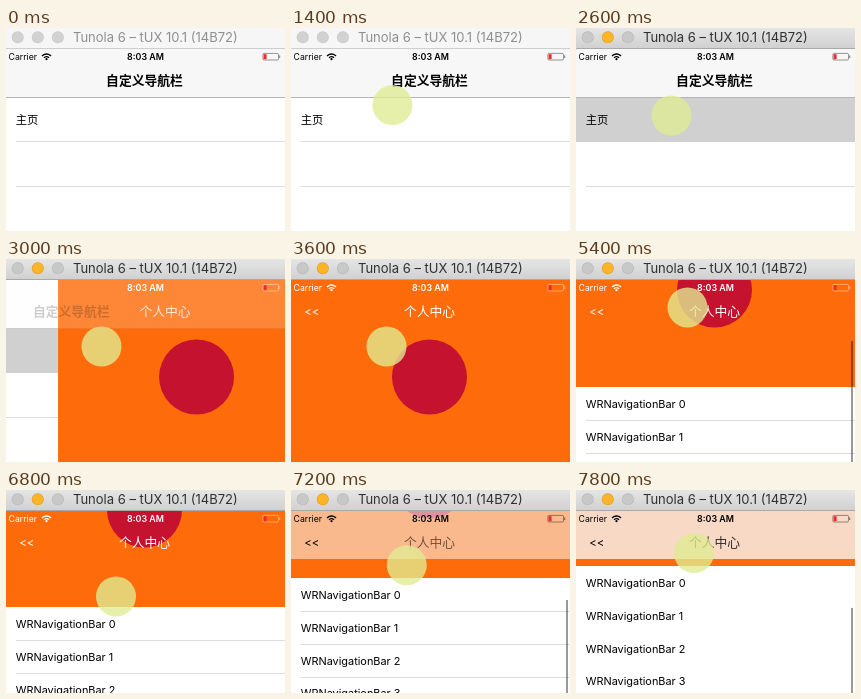
These frames come from a looping animation (279x203 px, 8000 ms). An HTML page with a canvas:

```html
<!DOCTYPE html>
<html lang="zh-CN">
<head>
<meta charset="utf-8">
<style>
html, body { margin: 0; width: 100%; height: 100%; overflow: hidden; background: #fff; }
canvas { display: block; width: 279px; height: 203px; }
</style>
</head>
<body>
<canvas id="stage" width="279" height="203"></canvas>
<script>
const W = 279, H = 203, LOOP = 8000, STEP = 200;
const BAR_TOP = 21, NAV_BOTTOM = 69, HOME_ROW = 45, ROW = 32.9, HEADER = 215;
const ORANGE = '#fe6b0a', LOGO = '#c4122f', LINE = '#dcdcdf';
const SANS = 'Inter, "Noto Sans CJK SC", "Noto Sans CJK", sans-serif';
const CJK = '"Noto Sans CJK SC", "Noto Sans CJK", sans-serif';
const ctx = document.getElementById('stage').getContext('2d');

// The pointer glides in, pulls down, drags the list, returns and drags again.
const start = { x: 148.5, y: -6, scroll: 0 };
const moves = [
  { from: 600, to: 1800, power: 2, x: 95.5, y: 87.5, scroll: 0 },
  { from: 3800, to: 4400, power: 1, x: 104.8, y: 126, scroll: 0 },
  { from: 4400, to: 5700, power: 1.5, x: 112.3, y: 38.8, scroll: 98 },
  { from: 5700, to: 6700, power: 1.5, x: 110, y: 106.5, scroll: 98 },
  { from: 6800, to: 7500, power: 1.5, x: 118, y: 63, scroll: 139 }
];

const clamp = v => Math.max(0, Math.min(1, v));
const mix = (a, b, f) => a + (b - a) * f;
const ease = (t, from, to, power) => 1 - (1 - clamp((t - from) / (to - from))) ** power;

function pointerAt(t) {
  return moves.reduce((p, m) => {
    const f = ease(t, m.from, m.to, m.power);
    return { x: mix(p.x, m.x, f), y: mix(p.y, m.y, f), scroll: mix(p.scroll, m.scroll, f) };
  }, start);
}

function rect(x, y, w, h, color) {
  ctx.fillStyle = color;
  ctx.fillRect(x, y, w, h);
}

function disc(x, y, r, color) {
  ctx.fillStyle = color;
  ctx.beginPath();
  ctx.arc(x, y, r, 0, Math.PI * 2);
  ctx.fill();
}

function text(str, x, y, font, color, align = 'left', alpha = 1) {
  ctx.globalAlpha = alpha;
  ctx.font = font;
  ctx.fillStyle = color;
  ctx.textAlign = align;
  ctx.fillText(str, x, y);
  ctx.globalAlpha = 1;
}

function drawHome(x, selected) {
  rect(x, BAR_TOP, W, H, '#fff');
  for (const row of [1, 2]) rect(x + 10, NAV_BOTTOM - 1 + row * HOME_ROW, W, 1, LINE);
  if (selected) rect(x, NAV_BOTTOM, W, HOME_ROW, '#d0d0d0');
  text('主页', x + 9.7, 95.8, `11.3px ${CJK}`, '#000');
}

function drawProfile(x, scroll) {
  const bottom = Math.round(HEADER - scroll);
  rect(x, BAR_TOP, W, H, '#fff');
  rect(x, BAR_TOP, W, bottom - BAR_TOP, ORANGE);
  disc(x + 138.5, bottom - 97, 37.5, LOGO);
  for (let i = 0; bottom + i * ROW < H; i++) {
    const top = bottom + i * ROW;
    text('WRNavigationBar ' + i, x + 9.7, top + 20.7, `10.9px ${SANS}`, '#000');
    if (scroll < 139) rect(x + 10, Math.round(top + ROW), W, 1, LINE);
  }
}

function drawNavBackground(alpha, hairline) {
  ctx.globalAlpha = alpha;
  rect(0, BAR_TOP, W, NAV_BOTTOM - BAR_TOP, '#f7f7f7');
  if (hairline) rect(0, NAV_BOTTOM, W, 1, '#b4b4b4');
  ctx.globalAlpha = 1;
}

function drawStatus(color) {
  text('Carrier', 2.6, 32.2, `8.7px ${SANS}`, color);
  text('8:03 AM', 139.5, 32.2, `600 8.9px ${SANS}`, color, 'center');
  ctx.strokeStyle = color;
  ctx.lineWidth = 1.3;
  for (const r of [3.3, 6]) {
    ctx.beginPath();
    ctx.arc(40.5, 32, r, -Math.PI * 0.77, -Math.PI * 0.23);
    ctx.stroke();
  }
  disc(40.5, 31.2, 1.1, color);
  ctx.globalAlpha = 0.5;
  ctx.lineWidth = 0.8;
  ctx.beginPath();
  ctx.roundRect(256.9, 25.4, 15.6, 6.6, 1.3);
  ctx.stroke();
  rect(273.2, 27.4, 1, 2.6, color);
  ctx.globalAlpha = 1;
  rect(257.6, 26.2, 3, 5, '#f5282d');
}

function drawWindowBar(active) {
  const shade = ctx.createLinearGradient(0, 0, 0, BAR_TOP);
  shade.addColorStop(0, active ? '#e6e5e6' : '#f6f6f6');
  shade.addColorStop(1, active ? '#d1d0d1' : '#f6f6f6');
  rect(0, 0, W, BAR_TOP, shade);
  rect(0, BAR_TOP - 1, W, 1, active ? '#a9a9a9' : '#cecece');
  for (let i = 0; i < 3; i++) {
    const x = 11.7 + i * 20.1;
    const lit = active && i === 1;
    disc(x, 9.3, 6, lit ? '#e0a02c' : active ? '#b8b8b8' : '#c9c9c9');
    disc(x, 9.3, 5.4, lit ? '#fdb527' : active ? '#c9c8c9' : '#d2d2d2');
  }
  text('Tunola 6 – tUX 10.1 (14B72)', 67, 14, `13px ${SANS}`, active ? '#303030' : '#8f8f8f');
}

function draw(t) {
  const push = ease(t, 2700, 3400, 3);
  const { x, y, scroll } = pointerAt(t);
  const cover = clamp((scroll - 101) / 48);
  const ink = push < 0.5 || cover > 0 ? '#000' : '#fff';

  if (push < 1) drawHome(-W * 0.3 * push, t >= 2600);
  if (push > 0) drawProfile(W * (1 - push), scroll);
  drawNavBackground(push < 1 ? 1 - push : cover, push < 1);

  const titleY = 57.2;
  const navInk = cover > 0 ? '#000' : '#fff';
  if (push < 1) {
    text('自定义导航栏', 138.5 - 90 * push, titleY, `bold 12.8px ${CJK}`, '#000', 'center', 1 - push);
  }
  if (push > 0) {
    text('个人中心', 138.5 + 110 * (1 - push), titleY, `12.8px ${CJK}`, navInk, 'center', cover || push);
    text('<<', 13.3, 56.8, `11.4px ${SANS}`, navInk, 'left', push);
  }
  drawStatus(ink);

  const scrolling = (t > 4400 && t < 6200) || t > 6800;
  if (scrolling) rect(275, 22 + scroll * 0.69, 2, H, 'rgba(0,0,0,0.4)');

  drawWindowBar(t >= 2600);
  if (t >= 600) disc(x, y, 20, 'rgba(225,236,147,0.78)');
}

function tick(now) {
  draw(Math.floor((now % LOOP) / STEP) * STEP);
  requestAnimationFrame(tick);
}
requestAnimationFrame(tick);
</script>
</body>
</html>
```
